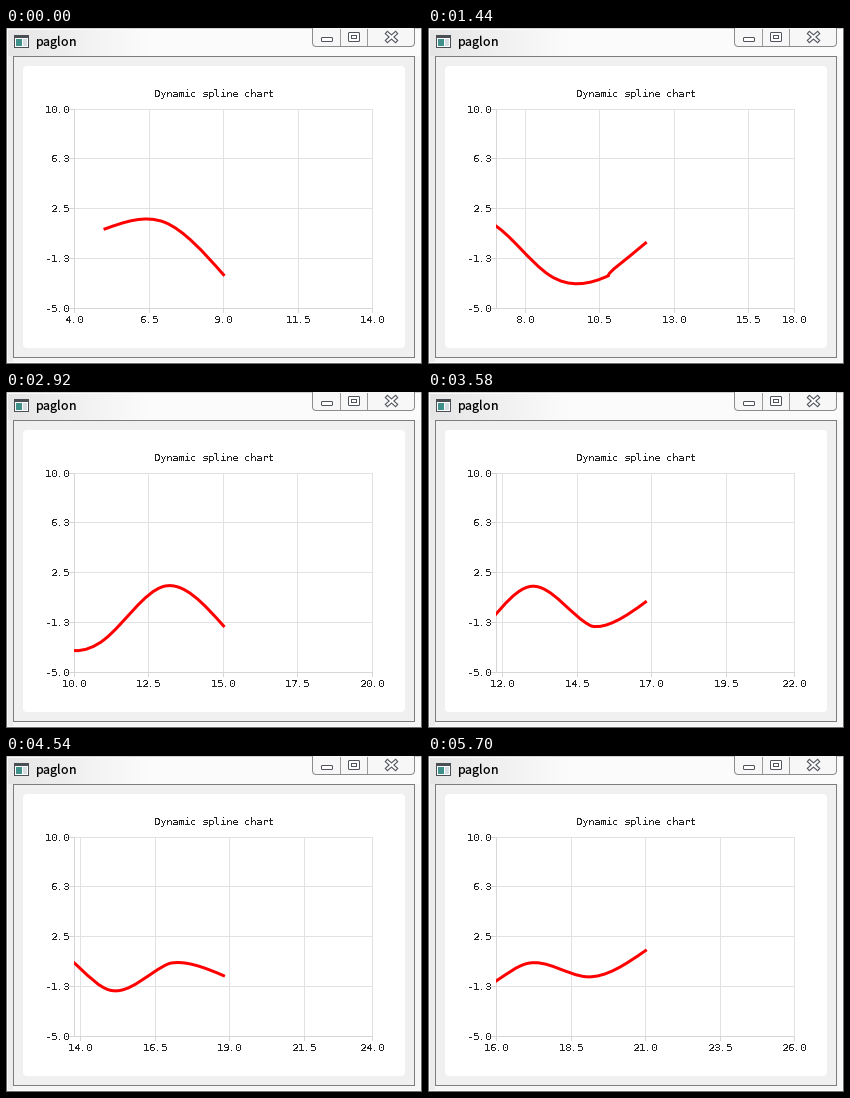
A matplotlib script for the animation above (5.78 s loop, 416 px wide and 336 px high).

```python
import math

import numpy as np
import matplotlib.pyplot as plt
from matplotlib.animation import FuncAnimation
from matplotlib.patches import FancyBboxPatch, PathPatch, Rectangle
from matplotlib.path import Path

plt.rcParams["text.hinting"] = "default"
plt.rcParams["text.hinting_factor"] = 1
plt.rcParams["toolbar"] = "None"

W, H, DPI = 416, 336, 100
STEP, LOOP = 20, 5780

# plot area in pixels and axis scale
LEFT, RIGHT, TOP, BOTTOM = 68, 366, 81, 280
UNIT_X = (RIGHT - LEFT) / 10
UNIT_Y = (BOTTOM - TOP) / 15
TICKS = np.linspace(LEFT, RIGHT, 5)

VALUES = [1, 1.5, -2.5, -2.5, 1.5, -1.5, 0.5, -0.5, 1.5]
POINTS = np.array([(5 + 2 * i, v) for i, v in enumerate(VALUES)], float)

# the chart scrolls two units per period, easing out over one second
FIRST, PERIOD, EASE = 280, 951, 1000

# repaint bursts: start, end, number of repaints
BURSTS = [(0, 120, 3), (360, 860, 8), (940, 1080, 3), (1220, 1740, 8),
          (1820, 2040, 4), (2260, 2780, 8), (2840, 3000, 3), (3140, 3660, 8),
          (3720, 4020, 5), (4160, 4680, 8), (4760, 4900, 3), (5120, 5640, 8),
          (5700, 5700, 1)]
REPAINTS = np.concatenate(
    [np.round(np.linspace(*b) / STEP) * STEP for b in BURSTS])

fig = plt.figure(figsize=(W / DPI, H / DPI), dpi=DPI, facecolor="#f6f6f6")
ax = fig.add_axes([0, 0, 1, 1])
ax.set_xlim(0, W)
ax.set_ylim(H, 0)
ax.axis("off")


def box(x, y, w, h, color):
    return ax.add_patch(Rectangle((x, y), w, h, fc=color, lw=0, aa=False))


def frame(x, y, w, h, color):
    for r in ((x, y, w, 1), (x, y + h - 1, w, 1), (x, y, 1, h), (x + w - 1, y, 1, h)):
        box(*r, color)


def rounded(x, y, w, h, r, face, edge="none", lw=0.0):
    return ax.add_patch(FancyBboxPatch(
        (x, y), w, h, boxstyle=f"round,pad=0,rounding_size={r}",
        fc=face, ec=edge, lw=lw * 72 / DPI))


def label(x, y, s, ha="left", px=10, font="DejaVu Sans Mono", color="#222222", aa=False):
    return ax.text(x, y, s, ha=ha, va="baseline", family=font, color=color,
                   fontsize=px * 72 / DPI, antialiased=aa)


def draw_window():
    # glass frame
    shade = np.linspace(0, 1, 60)[None, :]
    tone = 0.90 + 0.085 * np.minimum(1, shade * 3)
    ax.imshow(np.repeat(tone[..., None], 3, axis=2), extent=(0, W, 28, 0),
              aspect="auto", interpolation="bilinear", zorder=0)
    ax.set_xlim(0, W)
    ax.set_ylim(H, 0)
    box(0, 28, 7, 308, "#ececec")
    frame(0, 0, W, H, "#6e6e6e")
    box(1, 0, W - 2, 1, "#d0d0d0")
    frame(1, 1, W - 2, H - 2, "#fbfbfb")
    frame(7, 28, 402, 302, "#7d7d7d")
    box(8, 29, 400, 300, "#f0f0f0")

    # window glyph and caption
    box(8, 7, 15, 13, "#4a4f55")
    box(9, 10, 13, 9, "#ffffff")
    box(10, 11, 6, 7, "#3f8f8a")
    box(17, 11, 4, 7, "#d5dde2")
    label(29, 18, "paglon", px=12.4, font="Noto Sans CJK JP", color="#000000", aa=True)

    # caption buttons
    rounded(306.5, -8, 102, 26.5, 4, "#f7f7f7", "#8c8c8c", 1)
    for x in (334, 361):
        box(x, 1, 1, 17, "#9a9a9a")
    rounded(315.5, 9.5, 11, 4, 1, "#ffffff", "#50545c", 1)
    rounded(342.5, 4.5, 11, 9, 1, "#ffffff", "#50545c", 1)
    frame(345, 7, 6, 4, "#50545c")
    for color, lw in (("#50545c", 4.2), ("#ffffff", 2.0)):
        for s in (1, -1):
            ax.plot([381.5, 389.5], [9 - 3.5 * s, 9 + 3.5 * s], color=color,
                    lw=lw * 72 / DPI, solid_capstyle="projecting")

    # chart panel
    rounded(17, 38, 382, 282, 4, "#ffffff")
    label(208, 69, "Dynamic spline chart", "center")
    for i, v in enumerate(("10.0", "6.3", "2.5", "-1.3", "-5.0")):
        y = math.floor(TOP + i * (BOTTOM - TOP) / 4)
        box(LEFT, y, RIGHT - LEFT + 1, 1, "#e2e2e2")
        box(LEFT - 5, y, 5, 1, "#d6d6d6")
        label(63, y + 4, v, "right")


def to_px(pts, low):
    return np.column_stack([LEFT + 0.5 + (pts[:, 0] - low) * UNIT_X,
                            TOP + 0.5 + (10 - pts[:, 1]) * UNIT_Y])


def controls(p):
    """Bezier handles of the natural cubic spline, two per segment."""
    n = len(p) - 1
    if n == 1:
        c = (2 * p[0] + p[1]) / 3
        return np.array([c, 2 * c - p[0]])
    m = 4 * np.eye(n) + np.eye(n, k=1) + np.eye(n, k=-1)
    m[0, 0], m[-1, -1] = 2, 3.5
    rhs = 4 * p[:-1] + 2 * p[1:]
    rhs[0] = p[0] + 2 * p[1]
    rhs[-1] = (8 * p[-2] + p[-1]) / 2
    a = np.linalg.solve(m, rhs)
    b = np.vstack([2 * p[1:-1] - a[1:], (p[-1] + a[-1]) / 2])
    return np.stack([a, b], axis=1).reshape(-1, 2)


def spline(k, p):
    """Curve during scroll k; the newest point grows out of the last one."""
    pts, low = POINTS[:4 + k], 6 + 2 * k
    new, wide = to_px(pts, low), to_px(pts, low - 2)
    old = wide[:-1]
    old_c = np.vstack([controls(old), controls(wide)[-4:-2]])
    knots = np.vstack([old, old[-1:]]) * (1 - p) + new * p
    hands = old_c * (1 - p) + controls(new) * p
    verts = [knots[0]]
    for i in range(len(knots) - 1):
        verts += [hands[2 * i], hands[2 * i + 1], knots[i + 1]]
    return Path(verts, [Path.MOVETO] + [Path.CURVE4] * (len(verts) - 1))


draw_window()
grid = [box(x, TOP, 1, BOTTOM - TOP, "#e2e2e2") for x in TICKS]
marks = [box(x, BOTTOM, 1, 5, "#d6d6d6") for x in TICKS]
names = [label(x, 295, "", "center") for x in TICKS]
box(LEFT, TOP, 1, BOTTOM - TOP + 1, "#d6d6d6")
box(LEFT, BOTTOM, RIGHT - LEFT + 1, 1, "#d6d6d6")

curve = PathPatch(spline(0, 1), fc="none", ec="#ff0000", lw=3 * 72 / DPI,
                  capstyle="projecting", joinstyle="bevel", zorder=4)
ax.add_patch(curve)
clip = Rectangle((LEFT, TOP), RIGHT - LEFT, BOTTOM - TOP, transform=ax.transData)
curve.set_clip_path(clip)


def update(i):
    t = REPAINTS[REPAINTS <= i * STEP].max()
    k = math.floor((t - FIRST) / PERIOD)
    p = 1 - (1 - min(1, (t - FIRST - k * PERIOD) / EASE)) ** 4
    start = np.append(TICKS[1:], TICKS[-1])
    for j, x in enumerate(start * (1 - p) + TICKS * p):
        x = math.floor(x)
        grid[j].set_x(x)
        marks[j].set_x(x)
        names[j].set_x(x)
        names[j].set_text(f"{6 + 2 * k + 2.5 * j:.1f}")
    curve.set_path(spline(k, p))
    return [curve, *grid, *marks, *names]


anim = FuncAnimation(fig, update, frames=LOOP // STEP, interval=STEP,
                     repeat=True, repeat_delay=0, blit=False)
plt.show()
```
